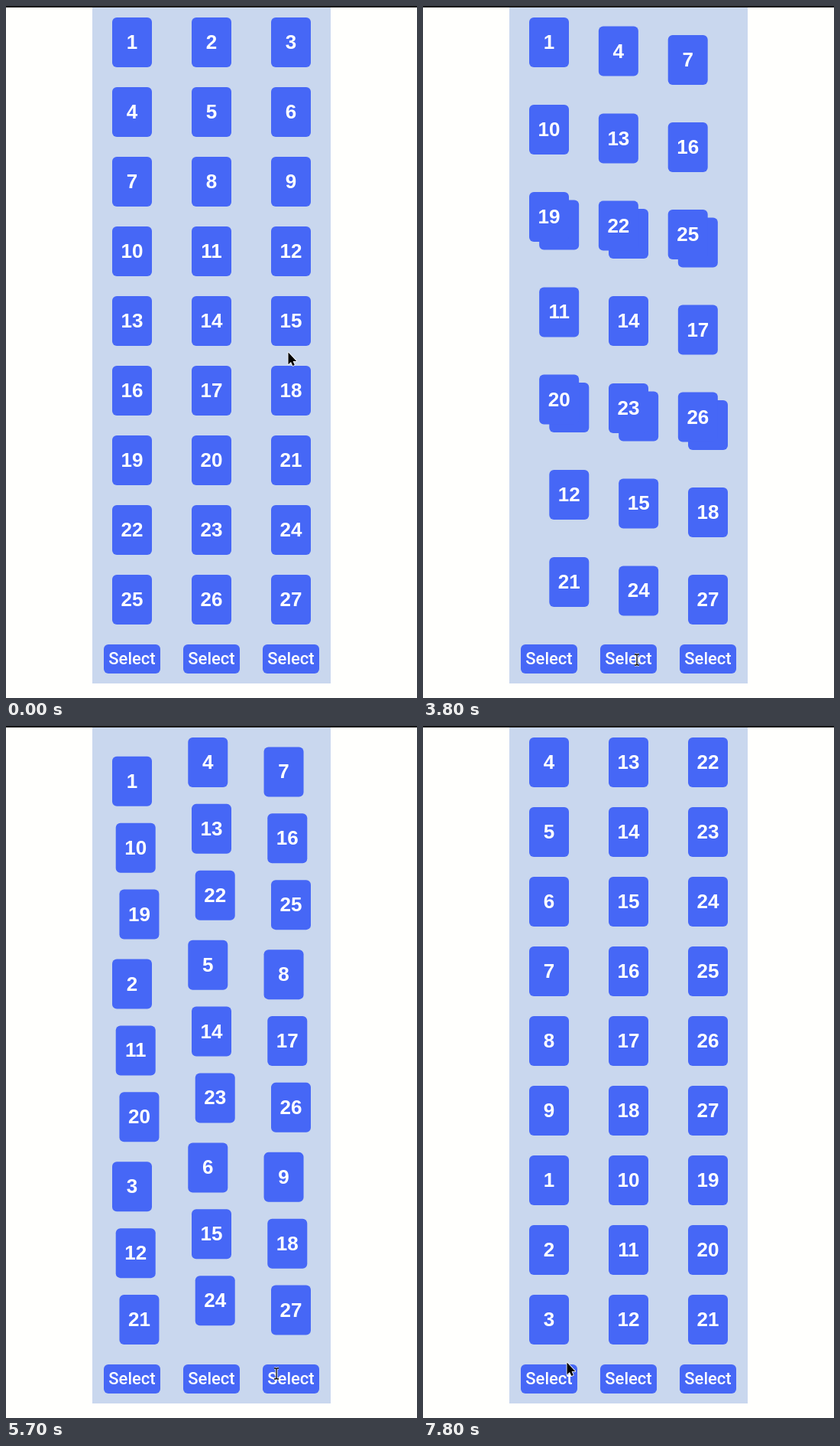
Animation of 538 by 904 pixels, one loop 8000 ms. Source, as an HTML page:

```html
<!DOCTYPE html>
<html lang="en">
<head>
<meta charset="utf-8">
<title>Card trick</title>
<style>
  html, body { margin: 0; width: 100%; height: 100%; overflow: hidden; background: #fffffd; }
  #stage { position: relative; width: 538px; height: 904px; overflow: hidden; }
  #stage > * { position: absolute; left: 0; top: 0; }
  #edge { width: 538px; height: 2px; background: linear-gradient(#111 1px, #2a2a2a 1px); }
  #panel { width: 312px; height: 883px; transform: translate(113px, 2px); background: #c9d7ee; }
  .card, .button { border-radius: 6px; background: #4667f6; color: #fff; text-align: center; white-space: nowrap; }
  .card { width: 52px; height: 65px; font: bold 26px/65px "Liberation Sans", Arial, sans-serif; }
  .button { width: 74px; height: 38px; font: 500 22px/38px Roboto, sans-serif; }
  #cursor { overflow: visible; }
</style>
</head>
<body>
<div id="stage">
  <div id="panel"></div>
  <div id="edge"></div>
  <svg id="cursor" width="1" height="1" stroke-linejoin="round">
    <path id="arrow" d="M.5 .5V16.2L4 12.9L6.4 18L8.8 17L6.6 11.9H11.2Z"
      fill="#000" stroke="#fff" paint-order="stroke" stroke-width="1.6"/>
    <g id="beam" fill="none">
      <path d="M-3 -7H-1L0 -6L1 -7H3M0 -6V6M-3 7H-1L0 6L1 7H3" stroke="#fff" stroke-width="3"/>
      <path d="M-3 -7H-1L0 -6L1 -7H3M0 -6V6M-3 7H-1L0 6L1 7H3" stroke="#000" stroke-width="1.3"/>
    </g>
  </svg>
</div>
<script>
const LOOP = 8000, TICK = 100, MOVE = 400;
const $ = id => document.getElementById(id);
const place = (el, x, y) => { el.style.transform = `translate(${x}px, ${y}px)`; };

function add(type, text) {
  const el = document.createElement('div');
  el.className = type;
  el.textContent = text;
  $('stage').insertBefore(el, $('cursor'));
  return el;
}

// Stack the three columns, then deal them out again row by row.
const deal = (slot, shift) => (slot + shift) % 3 * 9 + Math.floor(slot / 3);

const cards = Array.from({ length: 27 }, (_, i) => {
  const second = deal(i, 0);
  return { el: add('card', i + 1), slots: [i, second, deal(second, 2)] };
});
for (let c = 0; c < 3; c++) place(add('button', 'Select'), 128 + 104 * c, 834);

const clamp = v => Math.min(1, Math.max(0, v));
const mix = (a, b, p) => a + (b - a) * p;
const smooth = p => p * p * (3 - 2 * p);

// cubic-bezier(.4, 0, .2, 1)
function ease(x) {
  if (x <= 0 || x >= 1) return clamp(x);
  let lo = 0, hi = 1;
  for (let i = 0; i < 24; i++) {
    const s = (lo + hi) / 2, r = 1 - s;
    if (1.2 * s * r * r + 0.6 * s * s * r + s * s * s < x) lo = s; else hi = s;
  }
  return smooth(lo);
}

// time, x, y, text cursor
const path = [
  [0, 369, 452, 0], [400, 369, 452, 0], [1300, 280, 854, 1], [4900, 280, 854, 1],
  [5000, 295, 851, 0], [5300, 351, 838, 0], [5400, 351, 838, 0], [5500, 354, 846, 1],
  [7100, 354, 846, 1], [7200, 355, 847, 0], [7300, 355, 847, 0], [7800, 188, 831, 0],
  [LOOP, 188, 831, 0]
];

function drawCursor(t) {
  const n = path.findIndex(k => k[0] > t);
  const a = path[n - 1], b = path[n];
  const p = smooth((t - a[0]) / (b[0] - a[0]));
  place($('cursor'), Math.round(mix(a[1], b[1], p)), Math.round(mix(a[2], b[2], p)));
  $('arrow').style.display = a[3] ? 'none' : '';
  $('beam').style.display = a[3] ? '' : 'none';
}

function drawCards(t) {
  const second = t >= 5700;
  let p = 0;
  if (t >= 6400) p = 1;
  else if (second) p = ease(0.128 + (Math.min(t, 6000) - 5700) / MOVE); // settles late
  else if (t >= 3600) p = ease(0.097 + (t - 3600) / MOVE);
  for (const { el, slots } of cards) {
    const from = slots[+second], to = slots[second + 1];
    const row = mix(Math.floor(from / 3), Math.floor(to / 3), p);
    place(el, 139 + 104 * mix(from % 3, to % 3, p), 15 + 91 * row);
  }
}

const start = performance.now();
function frame() {
  const t = Math.floor((performance.now() - start) % LOOP / TICK) * TICK;
  drawCards(t);
  drawCursor(t);
  requestAnimationFrame(frame);
}
frame();
</script>
</body>
</html>
```
